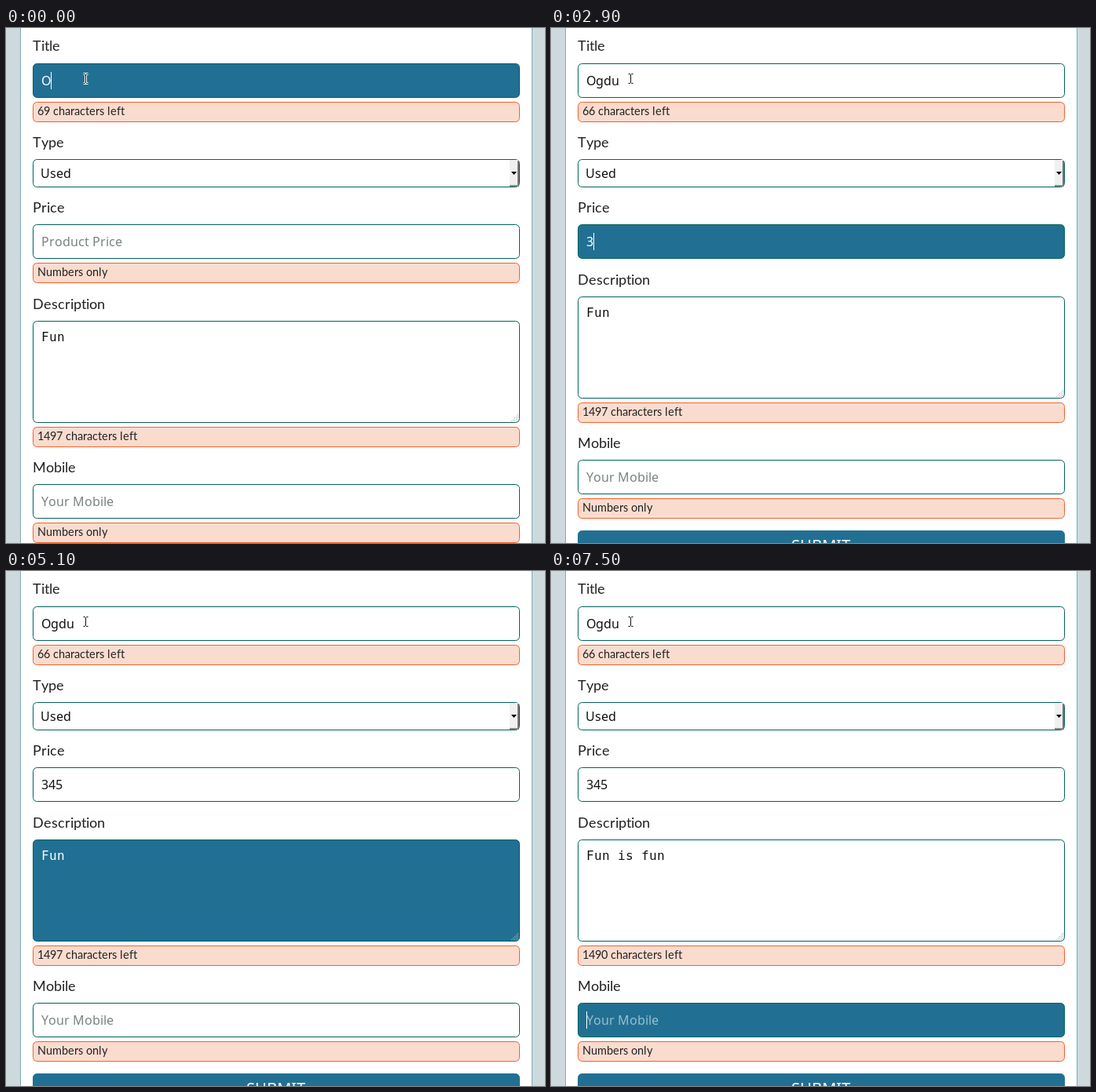
These frames come from a looping animation (686x656 px, 8 s). An HTML page with a canvas:

```html
<!DOCTYPE html>
<html lang="en">
<head>
<meta charset="utf-8">
<title>Product form</title>
<style>
  html, body { margin: 0; width: 100%; height: 100%; overflow: hidden; background: #cdd9dd; }
  canvas { display: block; }
</style>
</head>
<body>
<canvas width="686" height="656"></canvas>
<script>
const ctx = document.querySelector('canvas').getContext('2d');
const LOOP = 8000;
const SANS = '16px "Noto Sans", sans-serif';
const MONO = '16px "DejaVu Sans Mono", monospace';
const LABEL = '18px Lato, sans-serif';
const HINT = '14.4px Lato, sans-serif';
const BLUE = '#217093', TEAL = '#00625a', INK = '#111';

// Times at which each field gains one more character
const typed = {
  title: ['Ogdu', [0, 200, 500, 700]],
  price: ['345', [2900, 3200, 3500]],
  desc: ['Fun is fun', [0, 0, 0, 6500, 6600, 6700, 6900, 7000, 7100, 7300]]
};

function textAt(name, t) {
  const [full, times] = typed[name];
  return full.slice(0, times.filter(at => at <= t).length);
}

function focusAt(t) {
  if (t < 1100) return 'title';
  if (t < 1700) return 'type';
  if (t < 3900) return 'price';
  return t < 7500 ? 'desc' : 'mobile';
}

// Draws text with whole-pixel advances and returns its end
function text(str, x, y, font, color) {
  ctx.font = font;
  ctx.fillStyle = color;
  for (const ch of str) {
    ctx.fillText(ch, x, y);
    x += Math.max(4, Math.round(ctx.measureText(ch).width));
  }
  return x;
}

function rect(x, y, w, h, color) {
  ctx.fillStyle = color;
  ctx.fillRect(x, y, w, h);
}

function box(y, h, fill, stroke) {
  ctx.beginPath();
  ctx.roundRect(34.5, y + 0.5, 619, h - 1, 5);
  ctx.fillStyle = fill;
  ctx.fill();
  ctx.strokeStyle = stroke;
  ctx.lineWidth = 1;
  ctx.stroke();
}

function label(str, y) {
  text(str, 34, y, LABEL, '#222');
}

function hint(str, y) {
  box(y, 26, '#fadccf', '#f4602a');
  text(str, 40, y + 17, HINT, '#222');
}

function input(y, value, placeholder, focused) {
  box(y, 44, focused ? BLUE : '#fff', TEAL);
  const shown = value || placeholder;
  const color = value ? (focused ? '#fff' : INK)
    : focused ? 'rgba(255,255,255,.54)' : 'rgba(10,25,25,.54)';
  const end = text(shown, 45, y + 28, SANS, color);
  if (focused) rect(value ? end : 45, y + 11, 1, 22, '#fff');
}

function select(y, focused) {
  box(y, 36, focused ? BLUE : '#fff', TEAL);
  text('Used', 44, y + 24, SANS, focused ? '#fff' : INK);
  rect(641, y + 1, 12, 34, focused ? '#fff' : '#f0f0f0');
  rect(651, y + 2, 2, 33, '#777');
  rect(641, y + 33, 11, 2, focused ? '#aaa' : '#888');
  ctx.fillStyle = '#000';
  ctx.beginPath();
  ctx.moveTo(643, y + 16);
  ctx.lineTo(650, y + 16);
  ctx.lineTo(646.5, y + 20);
  ctx.fill();
  if (focused) {
    ctx.setLineDash([1, 1]);
    ctx.strokeStyle = '#dfeaf0';
    ctx.strokeRect(40.5, y + 6.5, 594, 23);
    ctx.setLineDash([]);
  }
}

function textarea(y, value, focused, caret) {
  box(y, 130, focused ? BLUE : '#fff', TEAL);
  const end = text(value, 45, y + 26, MONO, focused ? '#fff' : INK);
  if (caret) rect(end, y + 11, 1, 19, '#fff');
  for (let row = 0; row < 5; row++)
    for (let col = 0; col <= row; col++)
      rect(651 - col * 2 - (row % 2 ? 0 : 0), y + 119 + row * 2 - 0, 1, 1,
        focused ? '#a5bdc9' : '#aaa');
}

function pointer() {
  ctx.beginPath();
  for (const [y, bend] of [[58.5, 1], [70.5, -1]]) {
    ctx.moveTo(98.5, y);
    ctx.lineTo(100.5, y);
    ctx.lineTo(101.5, y + bend);
    ctx.lineTo(102.5, y);
    ctx.lineTo(104.5, y);
  }
  ctx.moveTo(101.5, 59);
  ctx.lineTo(101.5, 70);
  for (const [width, color] of [[3, '#fff'], [1, '#111']]) {
    ctx.lineWidth = width;
    ctx.strokeStyle = color;
    ctx.stroke();
  }
  ctx.lineWidth = 1;
}

function draw(t) {
  const focus = focusAt(t);
  const title = textAt('title', t), price = textAt('price', t), desc = textAt('desc', t);
  const up = price ? -31 : 0;

  rect(0, 0, 686, 656, '#cdd9dd');
  rect(18, 0, 652, 656, '#7fabb8');
  rect(19, 0, 650, 656, '#fff');

  label('Title', 29);
  input(45, title, '', focus === 'title');
  hint(70 - title.length + ' characters left', 94);

  label('Type', 152);
  select(167, focus === 'type');

  label('Price', 235);
  input(250, price, 'Product Price', focus === 'price');
  if (!price) hint('Numbers only', 299);

  label('Description', 358 + up);
  const blinkOff = t >= 5100 && t < 6300;
  textarea(373 + up, desc, focus === 'desc', focus === 'desc' && !blinkOff);
  hint(1500 - desc.length + ' characters left', 508 + up);

  label('Mobile', 566 + up);
  input(581 + up, '', 'Your Mobile', focus === 'mobile');
  hint('Numbers only', 630 + up);

  box(671 + up, 44, BLUE, BLUE);
  text('SUBMIT', 306, 697 + up, '20px "Noto Sans", sans-serif', '#fff');
  pointer();
}

function tick() {
  draw(performance.now() % LOOP);
  requestAnimationFrame(tick);
}
tick();
</script>
</body>
</html>
```
